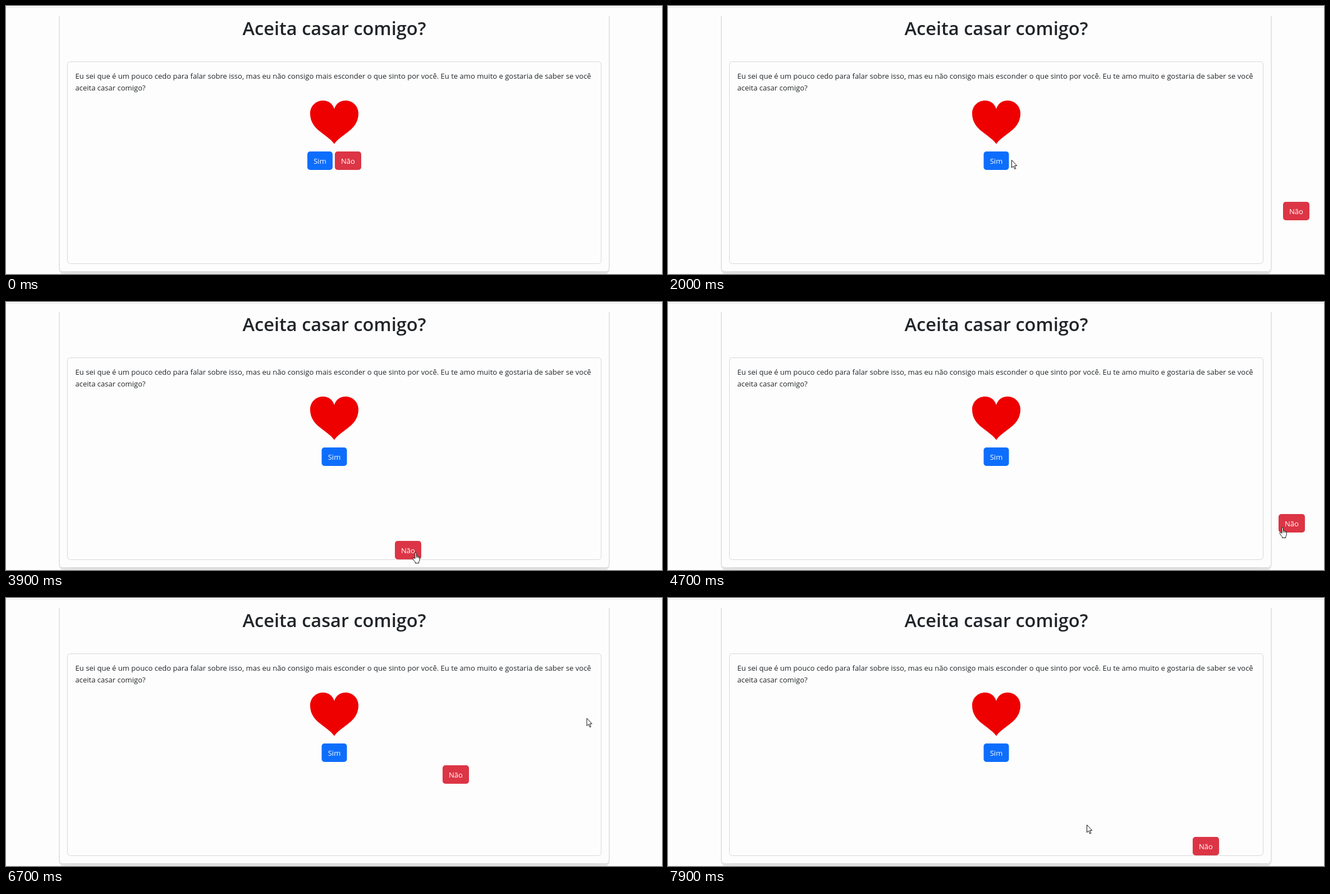
An HTML page that plays this animation: 1169x479 px, repeating every 8 s.

```html
<!DOCTYPE html>
<html lang="pt-BR">
<head>
<meta charset="utf-8">
<title>Aceita casar comigo?</title>
<style>
  html, body { margin: 0; width: 100%; height: 100%; overflow: hidden; background: #fdfdfd; }
  svg { display: block; width: 100%; height: 100%; }
  text { font: 400 13.06px "Open Sans", "Noto Sans", sans-serif; fill: #212529; }
  .title { font-size: 32.6px; font-weight: 600; }
  .mid { text-anchor: middle; }
  .btn text { fill: #fff; font-weight: 500; }
  .cursor path { fill: #fff; stroke: #111; stroke-linejoin: round; }
</style>
</head>
<body>
<svg viewBox="0 0 1169 479">
  <rect width="1169" height="479" fill="#fdfdfd"/>
  <path d="M0 2.5H1169" stroke="#e4e4e4"/>

  <!-- card -->
  <path d="M95 469Q95 479 103 479H1067Q1075 479 1075 469V475H95Z" fill="#e3e3e3"/>
  <path d="M95 18V468Q95 475 102 475H1068Q1075 475 1075 468V18" fill="#fdfdfd" stroke="#d9d9d9" stroke-width="1.4"/>
  <path d="M115 475.5H1055" stroke="#d3d3d3"/>
  <rect x="109.5" y="99.5" width="951" height="361" rx="5" fill="none" stroke="#d8d8d8"/>

  <text class="title mid" x="585" y="52">Aceita casar comigo?</text>
  <text x="123.5" y="130">Eu sei que é um pouco cedo para falar sobre isso, mas eu não consigo mais esconder o que sinto por você. Eu te amo muito e gostaria de saber se você</text>
  <text x="123.5" y="150.5">aceita casar comigo?</text>

  <path fill="#e00" d="M585 184C582 174 574 169 565 169C552 169 542 179 542 192C542 222 572 228 585 246.5C598 228 628 222 628 192C628 179 618 169 605 169C596 169 588 174 585 184Z"/>

  <g id="yes" class="btn">
    <rect width="45" height="33" rx="5" fill="#0d6efd"/>
    <text class="mid" x="22.5" y="21.5">Sim</text>
  </g>
  <g id="no" class="btn">
    <rect width="47" height="33" rx="5" fill="#dc3545"/>
    <text class="mid" x="23.5" y="21.5">Não</text>
  </g>

  <g id="cursor" class="cursor">
    <path id="arrow" d="M.5 .5V14L3.5 11.2L5.8 16.4L7.8 15.5L5.6 10.4H9.8Z"/>
    <g id="hand" transform="translate(-5.5 0)">
      <path d="M4.5 11.5V2Q4.5 .5 5.7 .5T7 2V7Q8.3 6.2 9 7.4Q10.3 6.9 10.8 8.2Q12.8 7.8 12.8 9.8V13Q12.8 15.5 11.3 17.2V19.5H5V17.6Q3.2 15.8 .8 11.8Q.2 10 1.6 9.7Q2.8 9.7 4.5 11.5Z"/>
      <path d="M7 7V10M9 7.6V10.2M10.9 8.4V10.6" stroke-width=".8"/>
    </g>
  </g>
</svg>
<script>
const LOOP = 8000, STEP = 100;
const $ = id => document.getElementById(id);
const point = (x, y) => ({ x, y });
const mix = (a, b, k) => a + (b - a) * k;
const ease = u => u * u * (3 - 2 * u);

const hand = point(16, 0);
const legs = [];
const escapes = [{ time: 0, x: 586, y: 260 }];

// The pointer glides to a point between two times.
function glide(begin, end, x, y) {
  const from = legs.length ? legs[legs.length - 1].to : hand;
  legs.push({ begin, end, from, to: point(x, y) });
}

// A glide that makes "no" jump away on arrival.
function chase(begin, end, x, y, noX, noY) {
  glide(begin, end, x, y);
  escapes.push({ time: end, x: noX, y: noY });
}

glide(300, 800, 649, 360);
glide(800, 1300, 598, 308);
chase(1400, 2000, 612, 275, 1096, 350);
chase(2200, 2900, 1119, 370, 693, 427);
chase(3100, 4000, 716, 450, 1088, 379);
glide(4400, 4700, 1095, 402);
chase(4800, 4900, 1130, 406, 404, 427);
chase(4900, 5800, 447.5, 440, 960, 206);
glide(5900, 6400, 858, 300);
chase(6500, 6700, 1034.5, 214.5, 778, 299);
glide(6700, 7100, 646, 399);
chase(7200, 7600, 790, 318, 935, 427);
glide(7600, 7900, 746, 405);

const lastBefore = (list, key, t) => list.filter(item => item[key] <= t).pop();

function pointerAt(t) {
  const leg = lastBefore(legs, "begin", t);
  if (!leg) return null;
  const k = ease(Math.min(1, (t - leg.begin) / (leg.end - leg.begin)));
  return point(mix(leg.from.x, leg.to.x, k), mix(leg.from.y, leg.to.y, k));
}

const place = (id, p) => $(id).setAttribute("transform", `translate(${p.x} ${p.y})`);
const show = (id, on) => $(id).setAttribute("visibility", on ? "visible" : "hidden");
const inside = (p, box, w) => p.x >= box.x && p.x <= box.x + w && p.y >= box.y && p.y <= box.y + 33;

function draw(ms) {
  const t = Math.floor((ms % LOOP) / STEP) * STEP;
  const no = lastBefore(escapes, "time", t);
  const yes = point(no === escapes[0] ? 537 : 562.5, 260);
  const p = pointerAt(t);
  const over = p && (inside(p, no, 47) || inside(p, yes, 45));
  place("yes", yes);
  place("no", no);
  if (p) place("cursor", p);
  show("arrow", p && !over);
  show("hand", p && over);
}

const start = performance.now();
function tick() {
  draw(performance.now() - start);
  requestAnimationFrame(tick);
}
tick();
</script>
</body>
</html>
```
